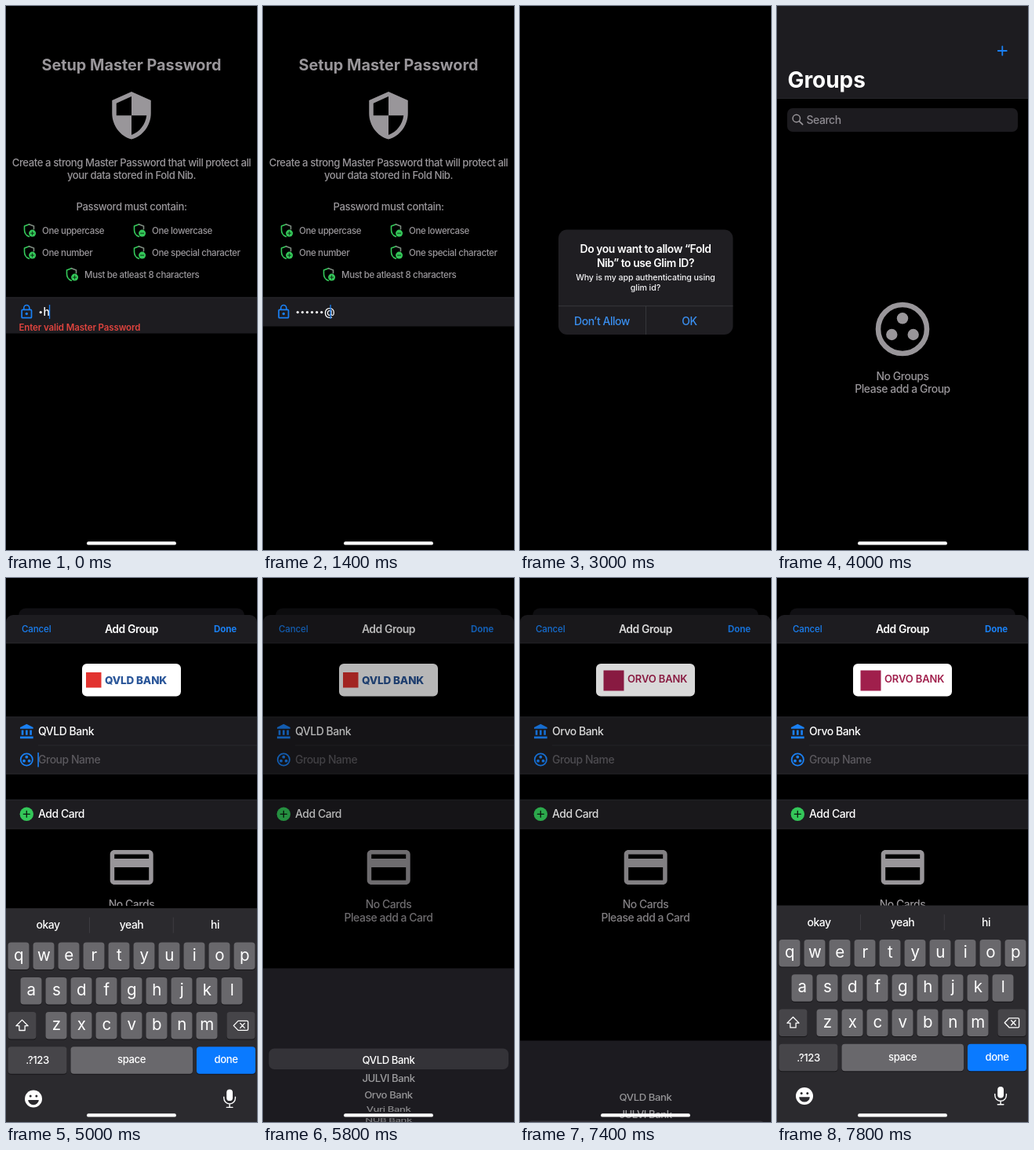
Write an HTML page that moves like this. It is 320x692 px and loops after 8 s.

```html
<!DOCTYPE html>
<html lang="en">
<head>
<meta charset="utf-8">
<title>Password setup and groups</title>
<style>
  html, body { margin: 0; width: 100%; height: 100%; overflow: hidden; background: #000; }
  svg { display: block; width: 100%; height: 100%; }
  text { font-family: Inter, "Open Sans", sans-serif; letter-spacing: -.032em; white-space: pre; }
  .loose { letter-spacing: -.01em; }
  .wide { letter-spacing: 0; }
  .mid { text-anchor: middle; }
</style>
</head>
<body>
<svg id="stage" viewBox="0 0 320 692"></svg>
<script>
const BLUE = '#1a80f4', GREEN = '#34c759', GREY = '#99969a', PANEL = '#1d1c20', EDGE = '#2c2b30';
const BODY = 13.95, CALL = 13.13, SMALL = 11.5;

const text = (x, y, s, size, fill, cls = '', weight = 450) =>
  `<text x="${x}" y="${y}" font-size="${size}" fill="${fill}" class="${cls}" font-weight="${weight}">${s}</text>`;
const mid = (x, y, s, size, fill, weight, cls = '') => text(x, y, s, size, fill, 'mid ' + cls, weight);
const rect = (x, y, w, h, fill, r = 0, more = '') =>
  `<rect x="${x}" y="${y}" width="${w}" height="${h}" rx="${r}" fill="${fill}" ${more}/>`;
const dot = (x, y, r, fill) => `<circle cx="${x}" cy="${y}" r="${r}" fill="${fill}"/>`;
const ring = (x, y, r, stroke, w) =>
  `<circle cx="${x}" cy="${y}" r="${r}" fill="none" stroke="${stroke}" stroke-width="${w}"/>`;
const line = (d, stroke, w = 1) =>
  `<path d="${d}" fill="none" stroke="${stroke}" stroke-width="${w}" stroke-linecap="round" stroke-linejoin="round"/>`;
const icon = (d, x, y, k, fill) => `<path transform="translate(${x} ${y}) scale(${k})" d="${d}" fill="${fill}"/>`;
const group = (id, body) => `<g id="${id}">${body}</g>`;
const panel = (y, h) => rect(0, y, 320, h, PANEL) + rect(0, y, 320, .8, EDGE) + rect(0, y + h - .8, 320, .8, EDGE);

// Password setup
function rule(x, y, s, plus) {
  const l = x - 24;
  return line(`M${l + 7.5} ${y - 7.8}l-6 2.4v4.6c0 3.9 2.3 7.2 5.8 8.6`, GREEN, 1.6) +
    line(`M${l + 7.5} ${y - 7.8}l6 2.4v3.6`, '#7d8a7f', 1.6) +
    dot(l + 11.6, y + 3.6, 4.5, GREEN) +
    line(`M${l + 9.5} ${y + 3.6}h4.2` + (plus ? 'm-2.1-2.1v4.2' : ''), '#06220d', .9) +
    text(x, y + 4, s, SMALL, GREY);
}

const setup =
  mid(160, 82, 'Setup Master Password', 19.8, GREY, 700, 'wide') +
  icon('M12 1L3 5v6c0 5.55 3.84 10.74 9 12 5.16-1.26 9-6.45 9-12V5zM12 12h7c-.53 4.12-3.28 7.79-7 8.94V12H5V6.3l7-3.11z',
    127, 106.3, 2.75, GREY) +
  mid(160, 204.3, 'Create a strong Master Password that will protect all', CALL, GREY) +
  mid(160, 220, 'your data stored in Fold Nib.', CALL, GREY) +
  mid(160, 260, 'Password must contain:', CALL, GREY) +
  rule(46, 285.5, 'One uppercase', true) + rule(186, 285.5, 'One lowercase', false) +
  rule(46, 313.5, 'One number', true) + rule(186, 313.5, 'One special character', false) +
  rule(100, 341.5, 'Must be atleast 8 characters', true) +
  group('tall', rect(0, 370.5, 320, 46, PANEL) + rect(0, 370.5, 320, .8, EDGE) +
    text(16.5, 412.8, 'Enter valid Master Password', SMALL, '#e0443e', 'loose', 600)) +
  group('short', rect(0, 370.5, 320, 37, PANEL) + rect(0, 370.5, 320, .8, EDGE)) +
  rect(20.1, 386.4, 12.4, 10.3, 'none', 1, `stroke="${BLUE}" stroke-width="1.7"`) +
  line('M22.8 386v-2a3.5 3.5 0 0 1 7 0v2', BLUE, 1.6) + dot(26.3, 391.5, 1.7, BLUE) +
  group('dots', Array.from({ length: 10 }, (_, i) => dot(44.2 + 6.1 * i, 389.6, 1.6, '#fff')).join('')) +
  text(0, 394, '', BODY, '#fff', '', 500).replace('<text', '<text id="last"') +
  rect(0, 380, 1.3, 18, BLUE, .6, 'id="caret"');

// Permission alert
const alertBox =
  rect(49, 284.5, 222.5, 133.5, '#1f1e22', 11) +
  rect(160.5, 382, 111, 36, '#38373c', 11, 'id="press"') +
  mid(160, 314.3, 'Do you want to allow “Fold', BODY, '#fff', 600) +
  mid(160, 332.3, 'Nib” to use Glim ID?', BODY, '#fff', 600) +
  mid(160, 348.8, 'Why is my app authenticating using', 10.67, '#f4f4f6', 450, 'loose') +
  mid(160, 361.8, 'glim id?', 10.67, '#f4f4f6', 450, 'loose') +
  rect(49, 381.3, 222.5, .8, '#3d3c41') + rect(160, 382, .8, 36, '#3d3c41') +
  mid(104.5, 405.5, 'Don’t Allow', BODY, '#3a8ff0') + mid(216, 405.5, 'OK', BODY, '#3a8ff0');

// Empty group list
const groups =
  rect(0, 0, 320, 117.5, PANEL) + rect(0, 117, 320, .8, EDGE) +
  line('M281.8 57h11M287.3 51.5v11', BLUE, 1.8) +
  text(13.5, 103.6, 'Groups', 27.9, '#fff', 'wide', 700) +
  rect(13, 130, 294, 30, '#1c1b1f', 7) + ring(24.8, 143, 4.7, GREY, 1.5) +
  line('M28.4 146.6l4.2 4', GREY, 1.7) + text(37.5, 150.2, 'Search', BODY, '#8e8b91') +
  ring(160, 411, 31, GREY, 6.6) +
  dot(160, 397.3, 7.2, GREY) + dot(146.3, 418, 7.2, GREY) + dot(173.7, 418, 7.2, GREY) +
  mid(160, 475.6, 'No Groups', BODY, GREY) + mid(160, 492, 'Please add a Group', BODY, GREY);

// Add group sheet
const banks = ['QVLD Bank', 'JULVI Bank', 'Orvo Bank', 'Vuri Bank', 'NUB Bank', 'Plain Bank of Ovria',
  'Tovel Zarandhi Bank', 'Dulora Bank', 'Ombrel Bank', 'Bank of Tesmarra'];
const logos = {
  0: rect(102, 120, 19.5, 19.5, '#e2332f') + text(126, 134.6, 'QVLD BANK', 13.5, '#2a5699', 'loose', 800),
  2: rect(106.5, 117.5, 26, 26, '#a01f4c') + text(137, 133.2, 'ORVO BANK', 13, '#a01f4c', 'loose', 600),
  3: dot(131, 117, 4.2, '#dd5a35') + mid(160, 140, 'vuribank', 23.5, '#24508f', 500, 'loose')
};

const sheet =
  rect(16, 38.5, 288, 30, '#111014', 9) +
  rect(0, 47, 320, 50, PANEL, 9) + rect(0, 83, 320, 609, '#000') + rect(0, 82.5, 320, .8, EDGE) +
  text(20, 69, 'Cancel', SMALL, BLUE, 'loose', 500) + mid(160, 70, 'Add Group', BODY, '#fff', 600) +
  text(265, 69, 'Done', SMALL, BLUE, 'loose', 700) +
  rect(97, 109, 126, 41.5, '#fff', 6) +
  Object.entries(logos).map(([i, body]) => group('logo' + i, body)).join('') +
  panel(176.5, 73) + rect(41, 212.5, 279, .8, EDGE) +
  icon('M4 10v7h3v-7zm6 0v7h3v-7zM2 22h19v-3H2zm14-12v7h3v-7zM11.5 1L2 6v2h19V6z', 16.2, 184.8, .88, BLUE) +
  text(41, 199.8, '', BODY, '#fff').replace('<text', '<text id="bank"') +
  ring(26.3, 231, 7.6, BLUE, 1.8) +
  dot(26.3, 227.7, 1.9, BLUE) + dot(23, 232.7, 1.9, BLUE) + dot(29.6, 232.7, 1.9, BLUE) +
  text(41, 236, 'Group Name', BODY, '#5b595e') + rect(40.3, 222, 1.6, 18.5, BLUE, .6, 'id="bar"') +
  panel(281.8, 37.5) + dot(26.3, 300.3, 8.7, GREEN) + line('M22.3 300.3h8M26.3 296.3v8', '#0b1a0f', 1.3) +
  text(41, 305, 'Add Card', BODY, '#fff') +
  icon('M20 4H4c-1.1 0-2 .9-2 2v12c0 1.1.9 2 2 2h16c1.1 0 2-.9 2-2V6c0-1.1-.9-2-2-2zm0 14H4v-6h16zm0-10H4V6h16z',
    127.2, 335, 2.75, GREY) +
  mid(160, 420.4, 'No Cards', BODY, GREY) + mid(160, 437, 'Please add a Card', BODY, GREY) +
  rect(0, 417, 320, 275, '#000', 0, 'id="cut"');

const key = (x, y, w, fill) => rect(x, y + 1, w, 34.5, '#161518', 4) + rect(x, y, w, 34.5, fill, 4);
const keyRow = (letters, x, y) => [...letters].map((c, i) =>
  key(x + 32 * i, y, 27, '#69686c') + mid(x + 32 * i + 13.5, y + 23, c, 20.5, '#fff', 400)).join('');

const keyboard =
  rect(0, 416.5, 320, 300, '#2b2a2e') +
  ['okay', 'yeah', 'hi'].map((s, i) => mid(53.5 + 106.5 * i, 442.6, s, BODY, '#fff')).join('') +
  rect(106.2, 428, .8, 20, '#434247') + rect(212.8, 428, .8, 20, '#434247') +
  keyRow('qwertyuiop', 2.5, 460) + keyRow('asdfghjkl', 18.5, 504.3) + keyRow('zxcvbnm', 50.5, 548.5) +
  key(2.5, 548.5, 36, '#464549') + key(281.5, 548.5, 36, '#464549') +
  line('M20.5 558.5l-7.6 7.6h4v5.8h7.2v-5.8h4z', '#fff', 1.3) +
  line('M296 559.8h11.2q1.4 0 1.4 1.4v9.2q0 1.4-1.4 1.4H296l-5.8-6zM298.6 562.8l5.6 6m0-6l-5.6 6', '#fff', 1.3) +
  key(2.5, 592.7, 75, '#464549') + key(82.5, 592.7, 155.5, '#69686c') + key(243, 592.7, 75, '#0a7aff') +
  mid(40, 614.6, '.?123', CALL, '#fff') + mid(160, 613.6, 'space', CALL, '#fff') + mid(280.5, 613.6, 'done', CALL, '#fff') +
  dot(35, 659, 11, '#fff') + dot(31.2, 655.5, 1.5, '#2b2a2e') + dot(38.8, 655.5, 1.5, '#2b2a2e') +
  '<path d="M28.2 660.3h13.6a6.8 6.3 0 0 1-13.6 0z" fill="#2b2a2e"/>' +
  rect(281.2, 647, 7.8, 14.5, '#fff', 3.9) +
  line('M277.8 656.5v1.5a7.3 7.3 0 0 0 14.6 0v-1.5M285.1 665.5v4M281.3 669.8h7.6', '#fff', 1.4);

const picker =
  rect(0, 462, 320, 240, '#1c1b20') + rect(7.5, 564, 305.5, 26.5, '#343338', 7) +
  group('wheel', banks.map(s => mid(0, 4.7, s, CALL, '#fff', 500)).join(''));

const $ = id => document.getElementById(id);
$('stage').innerHTML = rect(0, 0, 320, 692, '#000') +
  group('setup', setup) + group('alert', alertBox) + group('groups', groups) +
  group('sheet', sheet + group('keys', keyboard) + rect(0, 38, 320, 654, '#000', 0, 'id="dim"') + group('picker', picker)) +
  rect(103, 681.2, 114, 4.4, '#fff', 2.2, 'id="home"');

const show = (id, on) => $(id).setAttribute('opacity', +on);
const shift = (id, y) => $(id).setAttribute('transform', `translate(0 ${y})`);
// Looks up a value by step, holding the first and last.
const at = (list, start, t) => list[Math.max(0, Math.min(list.length - 1, (t - start) / STEP))];

const STEP = 200, LOOP = 8000, ANGLE = 15.5 * Math.PI / 180, RADIUS = 86;
const secret = 'Shadow@123';

function drawSetup(t) {
  const count = t < 1400 ? at([2, 3, 4, 5, 6, 6], 0, t) : at([7, 7, 8, 8, 9, 10], 1400, t);
  const plain = t !== 1000 && t !== 1200 && t !== 1600 && t !== 2000;
  const dots = plain ? count - 1 : count, x = 41.4 + 6.1 * dots;
  [...$('dots').children].forEach((d, i) => d.setAttribute('opacity', +(i < dots)));
  $('last').setAttribute('x', x);
  $('last').textContent = plain ? secret[count - 1] : '';
  $('caret').setAttribute('x', x + (plain ? 7.4 : .6));
  show('caret', t < 2200);
  show('tall', t < 1400);
  show('short', t >= 1400);
}

function drawSheet(t) {
  const late = t >= 7400;
  const up = late ? at([0, .6, 1], 7400, t) : at([.987, 1, .8, .25, 0], 5000, t);
  const pick = late ? at([.45, 0], 7400, t) : at([0, .4, .85, 1], 5400, t);
  shift('keys', 276 * (1 - up));
  shift('picker', 230 * (1 - pick));
  show('cut', up > .9);
  show('dim', .33 * pick);
  show('bar', t < 5400);

  const chosen = t < 6600 ? 0 : t < 7000 ? 3 : 2;
  $('bank').textContent = banks[chosen];
  for (const i in logos) show('logo' + i, +i === chosen);

  const pos = at([0, 1.1, 2.5, 3, 2.5, 2], 6000, t);
  [...$('wheel').children].forEach((el, i) => {
    const d = i - pos, a = d * ANGLE, c = Math.cos(a);
    el.setAttribute('transform', `translate(160 ${579 + RADIUS * Math.sin(a)}) scale(1 ${Math.max(c, .08)})`);
    el.setAttribute('opacity', Math.abs(a) > 1.63 ? 0 : Math.abs(d) < .5 ? 1 : .28 + .3 * Math.max(c, 0));
  });
}

function draw(now) {
  const t = Math.floor(now % LOOP / STEP) * STEP;
  show('setup', t < 2600 ? 1 : t < 2800 ? .4 : 0);
  show('alert', t < 2800 || t > 3400 ? 0 : at([.6, 1, 1, .4], 2800, t));
  show('press', t === 3200);
  const k = t === 2800 ? 1.08 : 1;
  $('alert').setAttribute('transform', `translate(160 351) scale(${k}) translate(-160 -351)`);
  show('groups', t < 3800 || t >= 5000 ? 0 : t < 4000 ? .5 : 1);
  show('sheet', t >= 5000);
  show('home', t < 2600 || t >= 3600);
  if (t < 2800) drawSetup(t);
  if (t >= 5000) drawSheet(t);
}

function loop() {
  draw(performance.now());
  requestAnimationFrame(loop);
}
loop();
</script>
</body>
</html>
```
